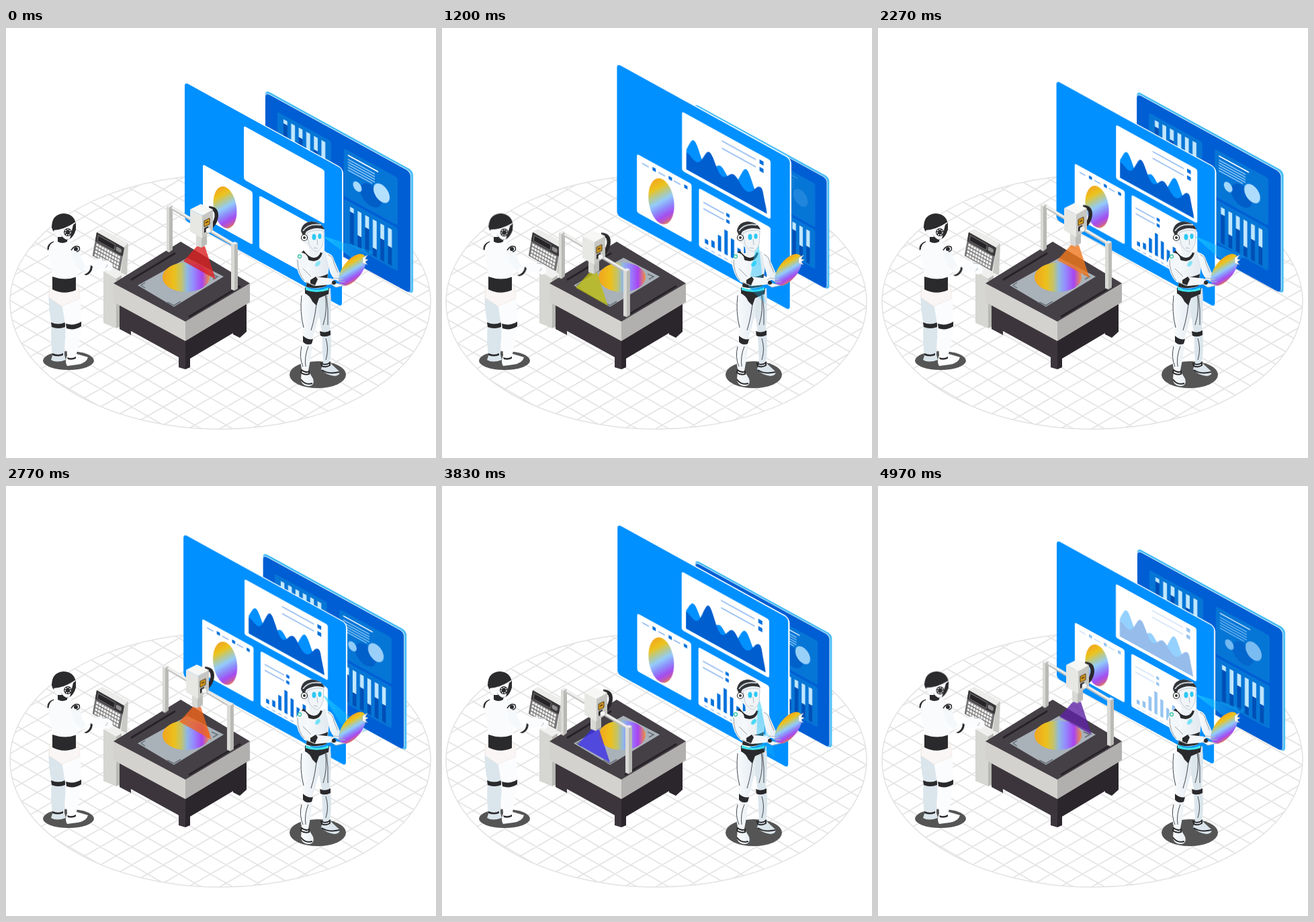
Write an HTML page that moves like this. It is 640x640 px and loops after 5.01 s.

```html
<!DOCTYPE html>
<html lang="en">
<head>
<meta charset="utf-8">
<title>Robot wafer lab</title>
<style>
html, body { margin: 0; width: 100%; height: 100%; overflow: hidden; background: #fff; }
svg { display: block; width: 100vw; height: 100vh; }
.swing, .gantry, .laser, .fade, .pulse, .nod, .tap, .glow { animation: 5010ms linear infinite; }
.swing { animation-name: swing; }
.front { transform-origin: 322px 359px; --far: scale(1.102); }
.back { transform-origin: 271px 324px; --far: scale(.909); }
.beam { transform-origin: 470px 309px; --far: rotate(72deg) scale(1.3, 1); }
@keyframes swing {
  0%, 47.2%, 98.8%, 100% { transform: none; }
  23.35%, 72.26% { transform: var(--far); }
}
.gantry { animation-name: gantry; animation-timing-function: cubic-bezier(.37, 0, .63, 1); }
@keyframes gantry {
  0% { transform: none; }
  22%, 72.6% { transform: translate(-66px, 40px); }
  48.9%, 98%, 100% { transform: translate(6px, -3.6px); }
}
.laser { animation-name: laser; }
@keyframes laser {
  0% { fill: #dc2020; } 12.6% { fill: #4fd60a; } 23% { fill: #b8c010; }
  35.3% { fill: #f08a1c; } 55.3% { fill: #f0641c; } 66% { fill: #a030b0; }
  76.4% { fill: #3a30e8; } 85% { fill: #a83890; } 91.2% { fill: #f0641c; }
  99.2% { fill: #5a22a8; } 100% { fill: #dc2020; }
}
.fade { animation-name: fade; }
@keyframes fade { 0%, 97.8% { opacity: 1; } 100% { opacity: .1; } }
.pulse { animation-name: pulse; }
@keyframes pulse {
  0%, 46% { opacity: 1; } 12.6%, 22% { opacity: .1; } 35.3% { opacity: .4; }
  55.3%, 76.4% { opacity: .85; } 91.2% { opacity: .15; } 99.2% { opacity: .65; } 100% { opacity: 1; }
}
.nod { animation-name: nod; transform-origin: 86px 314px; }
@keyframes nod {
  0%, 11%, 33%, 78%, 100% { transform: none; }
  13%, 24%, 90%, 99% { transform: rotate(4deg); }
}
.tap { animation-name: tap; transform-origin: 116px 364px; }
@keyframes tap {
  0%, 54%, 57%, 77%, 98%, 100% { transform: none; }
  6%, 13%, 25%, 35%, 45%, 66%, 84%, 92% { transform: translate(-4px, 1px) rotate(7deg); }
}
.glow { animation-name: glow; }
@keyframes glow { 0%, 47%, 99% { opacity: .55; } 24%, 73% { opacity: 1; } }
</style>
</head>
<body>
<svg viewBox="0 0 640 640">
  <defs>
    <clipPath id="floor"><ellipse cx="319" cy="408" rx="313" ry="189"/></clipPath>
    <linearGradient id="rainV" x1=".4" x2=".6" y2="1">
      <stop offset="0" stop-color="#f2a51e"/><stop offset=".2" stop-color="#ecc31c"/>
      <stop offset=".34" stop-color="#b9c98a"/><stop offset=".5" stop-color="#93cbfa"/>
      <stop offset=".66" stop-color="#8d8cfb"/><stop offset=".82" stop-color="#a54df0"/>
      <stop offset=".93" stop-color="#c65aa8"/><stop offset="1" stop-color="#e58a4e"/>
    </linearGradient>
    <linearGradient id="rainT" href="#rainV" gradientTransform="rotate(50 .5 .5)"/>
    <linearGradient id="rainH">
      <stop offset="0" stop-color="#f2a51e"/><stop offset=".25" stop-color="#ecc01c"/>
      <stop offset=".4" stop-color="#c3c468"/><stop offset=".52" stop-color="#8fb8e4"/>
      <stop offset=".66" stop-color="#948aff"/><stop offset=".84" stop-color="#a944f0"/>
      <stop offset="1" stop-color="#f0923c"/>
    </linearGradient>
    <linearGradient id="ray">
      <stop offset="0" stop-color="#22d4ff" stop-opacity=".6"/><stop offset="1" stop-color="#10b4ff" stop-opacity=".25"/>
    </linearGradient>
    <linearGradient id="skin"><stop offset="0" stop-color="#fbfcfd"/><stop offset="1" stop-color="#dfe8ef"/></linearGradient>
  </defs>

  <g clip-path="url(#floor)"><path id="grid" fill="none" stroke="#e5e5e5" stroke-width="1.8"/></g>
  <ellipse cx="319" cy="408" rx="313" ry="189" fill="none" stroke="#e2e2e2" stroke-width="1.5"/>

  <!-- rear screen -->
  <g class="swing back">
    <g transform="matrix(1 .548 0 1 386 92)">
      <rect width="220" height="184" rx="6" fill="#45bdf5"/>
      <rect y="3" width="217" height="181" rx="6" fill="#e4f5ff"/>
      <rect y="4" width="216" height="181" rx="6" fill="#005ed4"/>
      <rect x="18" y="23" width="80" height="64" rx="3" fill="#0676d6"/>
      <g id="barsA"></g>
      <g fill="#0676d6">
        <rect x="117" y="23" width="80" height="71" rx="3"/>
        <rect x="117" y="98" width="80" height="64" rx="3"/>
      </g>
      <g class="pulse">
        <path d="M123 30h45" stroke="#fff" stroke-width="2"/>
        <path d="M123 36h40m-40 4h40m-40 4h40m-40 4h40m-40 4h36" stroke="#a8d8ff" stroke-width="1.5"/>
        <ellipse cx="157" cy="71" rx="16" ry="16" fill="#005cc8"/>
        <ellipse cx="137" cy="69" rx="6.5" ry="7" fill="#a8dcff"/>
        <ellipse cx="173" cy="59" rx="12" ry="13" fill="#b4e0ff"/>
      </g>
      <g id="barsB"></g>
    </g>
  </g>

  <!-- front screen -->
  <g class="swing front">
    <g transform="matrix(1 .551 0 1 266 83)">
      <rect x="1" y="-4" width="235" height="207" rx="7" fill="#fff"/>
      <rect y="-2.500" width="234" height="205.500" rx="5" fill="#0090ff"/>
      <g fill="#fff">
        <rect x="88" y="14" width="120" height="80" rx="3"/>
        <rect x="27" y="105" width="74" height="79" rx="3"/>
        <rect x="111" y="105" width="97" height="79" rx="3"/>
      </g>
      <g class="fade">
        <path id="waveLight" fill="#0090ff"/><path id="waveDark" fill="#005ecf"/>
        <g id="legend"></g>
      </g>
    </g>
    <ellipse cx="326" cy="267" rx="17" ry="31.500" transform="rotate(-9 326 267)" fill="url(#rainV)"/>
  </g>

  <!-- console -->
  <path d="M145 362l21-12 20 12-22 12z" fill="#f0f0ee"/>
  <path d="M145 362l19 11v74l-19-8z" fill="#d6d6d2"/>
  <path d="M164 373l8-5v75l-8 4z" fill="#b9b9b6"/>
  <path d="M135 303l8-4 39 21-2 48-9-4-42-25z" fill="#ececea"/>
  <path d="M176 326l6-6-2 48-9-4z" fill="#c9c9c6"/>
  <g transform="matrix(1 .56 -.18 1 135 304)">
    <rect width="41" height="35" rx="1" fill="#767476"/>
    <rect width="41" height="13" rx="1" fill="#3a383b"/>
    <rect x="3" y="3" width="25" height="8" fill="#262426" stroke="#8a8a8a" stroke-width=".7"/>
    <rect x="30" y="4" width="8" height="6" rx="2" fill="#8c8c8c"/>
    <g id="keys" fill="#f0f0ee"></g>
  </g>

  <!-- scanner table -->
  <path d="M169 412l98 52v44l-10-3v-15l-71-39v6l-17-9z" fill="#3c363c"/>
  <path d="M267 462l91-52v42l-10 9-10-5v-2l-64 38v13l-7 3z" fill="#2a262b"/>
  <path d="M160 380l107 57v29l-107-58z" fill="#d3d2ce"/>
  <path d="M267 437l96-57v28l-96 58z" fill="#b1b0ae"/>
  <path d="M160 380l100-62 103 62-96 57z" fill="#454046"/>
  <path d="M186 375l66-40M272 430l77-46" stroke="#262227" stroke-width="3"/>
  <path d="M196 383l74-41 54 28-74 45z" fill="#a9b1b9"/>
  <path d="M207 379l-6 4 6 4M240 408l10 5 10-6M306 366l9 4-7 4" fill="none" stroke="#666e76" stroke-width="1.5"/>
  <ellipse cx="268" cy="371" rx="35" ry="22" fill="url(#rainH)"/>

  <!-- gantry -->
  <g class="gantry">
    <path class="laser" d="M284 325h12l16 49-48-27z" fill-opacity=".8"/>
    <path d="M239 265l4 2v67l-4-2z" fill="#d9d9d6"/><path d="M243 267l5-3v66l-5 4z" fill="#b8b8b5"/><path d="M239 265l5-3 4 2-5 3z" fill="#eee"/>
    <path d="M247 268l91 54" stroke="#bcbcba" stroke-width="5"/>
    <path d="M247 267l91 54" stroke="#f2f2f0" stroke-width="3"/>
    <path d="M302 268q13 0 11 14-2 10-9 15" fill="none" stroke="#2a272b" stroke-width="5.500"/>
    <path d="M283 305l8 4v18l-8-3z" fill="#d9d9d6"/><path d="M291 309l8-5v18l-8 5z" fill="#bcbcb9"/>
    <path d="M274 270l18 9v34l-18-10z" fill="#e7e7e4"/>
    <path d="M292 279l16-9v31l-16 12z" fill="#c6c6c3"/>
    <path d="M274 270l16-8 18 8-16 9z" fill="#f7f7f5"/>
    <path d="M295 287l8-4v9l-8 4z" fill="#d79a1c" stroke="#4a3a1a" stroke-width="1"/>
    <path d="M297 290l4-2" stroke="#4a3a1a" stroke-width="1.5"/>
    <path d="M295 298l6-3v6l-6 4z" fill="#29262a"/><circle cx="301" cy="301" r="3.5" fill="#f5f5f5"/>
    <path d="M335 321l5 2v68l-5-2z" fill="#dadad7"/><path d="M340 323l5-3v68l-5 3z" fill="#b9b9b6"/><path d="M335 321l5-3 5 2-5 3z" fill="#eee"/>
  </g>

  <!-- operator -->
  <ellipse cx="93" cy="495" rx="38" ry="14" fill="#555"/>
  <g>
    <path d="M64 390q-2 25 4 50-2 26 1 48l-2 6q8 5 22 0l-2-8 2-48 3-44z" fill="#dbe5ec"/>
    <path d="M67 438q11 5 21 0v7q-10 4-20 0z" fill="#2a2a2c"/><path d="M69 484q9 4 16 0v3q-8 3-16 0z" fill="#2a2a2c"/>
    <path d="M82 404l29-12q0 26 1 50-3 26-7 43l17 5q-2 9-16 11l-15 2q-4-6 0-16-2-26-3-46z" fill="#fbfcfd"/>
    <path d="M89 440q12 4 23-3v7q-11 7-22 3z" fill="#2a2a2c"/><path d="M91 490q7 3 13-1v3q-6 3-12 1z" fill="#2a2a2c"/>
    <path d="M65 384q20 12 43-1 2 12 1 20l-26 11-19-13z" fill="#f9f6f5" stroke="#f2e6e2" stroke-width=".8"/>
    <path d="M69 369q18 6 35 1v20q-18 8-35-1z" fill="#2a2a2c"/>
    <path d="M62 322q10-6 20-5l14 2q13 2 13 12l-3 39q-18 7-37 0l-5-32z" fill="#fafbfc"/>
    <path d="M62 330q-1-9 9-12-7 3-8 12z" fill="#2a2a2c" stroke="#2a2a2c"/>
    <path d="M97 320q13 2 14 14 0 13 10 22l-7 8q-14-10-16-26z" fill="#f5f8fa"/>
    <path d="M97 331q5-9 12-5 2 6-4 7" fill="none" stroke="#2a2a2c" stroke-width="1.5"/><circle cx="104" cy="329" r="3" fill="#2a2a2c"/>
  </g>
  <g class="tap">
    <path d="M115 358l22-15 14 2q8 4 8 13l-6 4-10-4-24 7z" fill="#fbfcfd"/>
    <path d="M116 367q10-3 10-14l3 2q-1 10-9 13z" fill="#2a2a2c"/>
    <path d="M143 345l9 1m-4 11q3-2 3-5M155 342l2 4" stroke="#a9b2ba" stroke-width="1" fill="none"/>
  </g>
  <path d="M77 311h15l-1 7q-7 4-14 0z" fill="#2a2a2c"/>
  <g class="nod">
    <path d="M68 297q0-20 18-21 17 1 18 18 0 17-15 22-4-1-7-8l-12-6z" fill="#2b2a2d"/>
    <path d="M71 301q16-1 32-12l1 6q-1 17-14 20-5-2-8-7l-9-2z" fill="#f8fafb"/>
    <path d="M100 293l4-3v10q-3 10-9 14z" fill="#2b2a2d"/>
    <circle cx="92" cy="304" r="6" fill="#2b2a2d"/><circle cx="92" cy="304" r="4" fill="none" stroke="#fff" stroke-width="1.5" stroke-dasharray="2 1.5"/>
  </g>

  <!-- inspector -->
  <ellipse cx="464" cy="516" rx="42" ry="20" fill="#555"/>
  <path d="M461 393l22-6q2 30-1 59 4 25 0 52l14 13q2 6-7 7-14-2-20-10l3-10-2-46z" fill="#dbe5ec"/>
  <path d="M467 451q8 4 16-1v7q-8 4-15 1z" fill="#2a2a2c"/>
  <path d="M469 499q7 4 13-1v4q-6 4-12 1zM470 509q10 7 26 3" fill="none" stroke="#2a2a2c" stroke-width="2"/>
  <path d="M442 389l27 8q-3 38-13 65-1 24-6 48l7 12q3 10-6 11-9 0-12-8l1-17q-5-25 2-46-7-35 0-73z" fill="url(#skin)"/>
  <path d="M442 458q7 7 15 5l-2 7q-8 3-13-3z" fill="#2a2a2c"/>
  <path d="M440 509q6 5 11 2v4q-7 2-12-2zM439 523q6 9 17 6" fill="none" stroke="#2a2a2c" stroke-width="2"/>
  <path d="M440 398q-3 25 3 48m20-46q-2 28-9 50M475 396q4 24-3 46m5-44q3 20 2 44M440 474q-4 16 2 30m8-30q-6 14-4 30M476 462q5 16 0 32" fill="none" stroke="#44484e" stroke-width="1"/>
  <path d="M445 386q17 7 36 1l-1 9-14 6-4 11-6-6q-4-9-11-12z" fill="#2a2a2c"/>
  <path d="M443 336l32-4q8 6 7 16l-5 36q-14 7-30 1l2-21z" fill="url(#skin)"/>
  <path d="M449 367q12 8 30-1l-2 18q-14 6-30 1z" fill="#2a2a2c"/>
  <path d="M446 386q17 7 34 0v4q-18 6-34 0z" fill="#3fe2ee"/>
  <path d="M443 331q7 10 15 11 8-1 10-8l3 1q-3 11-13 12-11 0-19-12z" fill="#2a2a2c"/>
  <path d="M451 325l14 3v9q-7 6-13-1z" fill="#eef2f5"/>
  <ellipse class="glow" cx="464" cy="351" rx="3" ry="5" transform="rotate(40 464 351)" fill="#3ed8f6"/>
  <g class="swing beam"><path d="M470 309l77 24-25 15z" fill="url(#ray)"/></g>
  <path d="M476 334q10 1 13 13l8 18 6 3-8 9q-8-2-13-14z" fill="url(#skin)"/>
  <path d="M479 337q8 3 9 13l6 14" fill="none" stroke="#8d969e" stroke-width=".9"/>
  <path d="M437 334q11 0 13 10l-3 15 12 11 27 3 5 8-30 3-17-6q-11-11-13-31z" fill="#f4f7f9"/>
  <path d="M442 358l12 12m5 14l-12-6M434 345q0 20 10 31" fill="none" stroke="#8d969e" stroke-width=".9"/>
  <path d="M453 375l8-5 3 4-4 9-7-3z" fill="#2a2a2c"/>
  <circle cx="437" cy="340" r="2.5" fill="none" stroke="#38c8a8" stroke-width="1.3"/>
  <path d="M438 304q1-14 17-16 16 1 19 13l-2 20q-3 11-9 13-9-2-15-11l-8-7z" fill="#edf2f6"/>
  <path d="M439 302q2-13 16-14 15 1 19 12-14-5-27 3l-4 8z" fill="#333438"/>
  <path d="M442 302q8-12 27-9" fill="none" stroke="#cbd4db" stroke-width="2"/>
  <path d="M448 305q12-6 25-3l-1 19q-4 10-9 12-8-3-12-11z" fill="#f0f4f7" stroke="#bac5ce" stroke-width=".8"/>
  <circle cx="444" cy="312" r="4.5" fill="#fff" stroke="#333" stroke-width="1.2"/><circle cx="444" cy="312" r="2" fill="#333"/>
  <ellipse cx="458.500" cy="311" rx="3" ry="4.500" fill="#2cc9f4"/><ellipse cx="467" cy="310" rx="2.600" ry="4" fill="#2cc9f4"/>
  <path d="M463 314l1 9m-6 4l6 1" fill="none" stroke="#a8b4be" stroke-width=".9"/>
  <ellipse cx="515.500" cy="360" rx="28" ry="14" transform="rotate(-52 515.500 360)" fill="url(#rainT)"/>
  <path d="M484 375l5-3 4 1 9 1m-9 3l12 1m-13 2l12 3-13 3-8-5z" fill="#f4f7f9" stroke="#a8b4be" stroke-width="1"/>
  <circle cx="488" cy="379" r="3" fill="#2a2a2c"/>
  <path d="M531 342l7-4-4 6 5 1-5 3 4 4-7-2z" fill="#fff" stroke="#aebbc5" stroke-width=".7"/>
</svg>

<script>
const LOOP = 5010;
const $ = id => document.getElementById(id);
const clamp = v => Math.max(0, Math.min(1, v));

function rect(parent, x, y, w, h, fill) {
  const el = document.createElementNS('http://www.w3.org/2000/svg', 'rect');
  for (const [k, v] of Object.entries({ x, y, width: w, height: h })) el.setAttribute(k, v);
  if (fill) el.setAttribute('fill', fill);
  return $(parent).appendChild(el);
}

let lines = '';
for (let y = -300; y < 1100; y += 27) lines += `M0 ${y}l640 369M0 ${y}l640 -369`;
$('grid').setAttribute('d', lines);

for (let row = 0; row < 4; row++)
  for (let col = 0; col < 9; col++) rect('keys', 2.5 + col * 4, 15 + row * 5, 3.2, 3.6);

// Columns on the rear screen: a pale level above a dark remainder.
const COLUMN = 54;
const levels = [];
function columns(parent, x, y, sizes) {
  sizes.forEach((size, i) => {
    rect(parent, x + i * 11.3, y, 5.8, COLUMN, '#004fb6');
    levels.push({ el: rect(parent, x + i * 11.3, y, 5.8, size, '#c0e7ff'), size });
  });
}
columns('barsA', 27, 29, [6, 25, 14, 28, 20, 25]);
columns('barsB', 126, 105, [7, 36, 18, 42, 22, 27]);

// Front screen parts that grow in one after another.
const parts = [];
function grow(start, x, y, w, h, fill, up) {
  parts.push({ el: rect('legend', x, y, w, h, fill), start, x, y, w, h, up });
}
const pale = '#9dc1f2', blue = '#0070dc';
for (let i = 0; i < 2; i++) {
  grow(300 + i * 350, 142, 23 + i * 10, 46, 2, pale);
  grow(420 + i * 350, 193, 21 + i * 10, 5.5, 5.5, blue);
  grow(250 + i * 100, 117, 120 + i * 8.5, 28, 2, pale);
  grow(350 + i * 100, 148, 118 + i * 8.5, 4.5, 4.5, blue);
}
[34, 56, 77].forEach((x, i) => {
  grow(300 + i * 220, x, 113, 9, 2, pale);
  grow(400 + i * 260, x + 14, 111, 4.5, 4.5, blue);
});
[6, 9, 21, 33, 26, 18, 27, 15, 22, 30].forEach((h, i) => {
  grow(540 + i * 60, 119 + i * 8.8, 175 - h, 4.5, h, blue, true);
  grow(500 + i * 60, 119 + i * 8.8, 180, 4.5, 1.5, pale);
});

function wave(id, bumps, rise) {
  let d = 'M94 89';
  for (let x = 94; x <= 203; x += 1.5) {
    let h = 13;
    for (const [c, a] of bumps) h += a * Math.exp(-(((x - c) / 11) ** 2));
    d += `L${x} ${(89 - h * rise * clamp((204 - x) / 7)).toFixed(2)}`;
  }
  $(id).setAttribute('d', d + 'L203 89Z');
}

function track(keys, t) {
  const i = Math.max(1, keys.findIndex(k => k[0] >= t));
  const [t0, a] = keys[i - 1], [t1, b] = keys[i];
  return a + (b - a) * (t - t0) / (t1 - t0);
}
const morph = [[0, 0], [1770, .05], [2770, .4], [3830, .6], [4570, 1], [4970, .1], [LOOP, 0]];

function draw() {
  const t = performance.now() % LOOP;
  const m = track(morph, t);
  const rise = Math.sin(clamp((t - 60) / 480) * Math.PI / 2);
  wave('waveLight', [[104, 32 - 9 * m], [140, 17], [175, 32 - 6 * m]], rise);
  wave('waveDark', [[94, 10], [125, 27 + 14 * m], [158, 15 + 8 * m], [194, 18 + 4 * m]], rise);

  for (const { el, start, y, w, h, up } of parts) {
    const k = clamp((t - start) / 250);
    el.setAttribute('width', up ? w : w * k);
    el.setAttribute('height', up ? h * k : h);
    if (up) el.setAttribute('y', y + h * (1 - k));
  }
  const swap = Math.sin(t / LOOP * 2 * Math.PI) ** 2;
  for (const { el, size } of levels)
    el.setAttribute('height', size + (COLUMN - 2 * size) * swap);
  requestAnimationFrame(draw);
}
draw();
</script>
</body>
</html>
```
